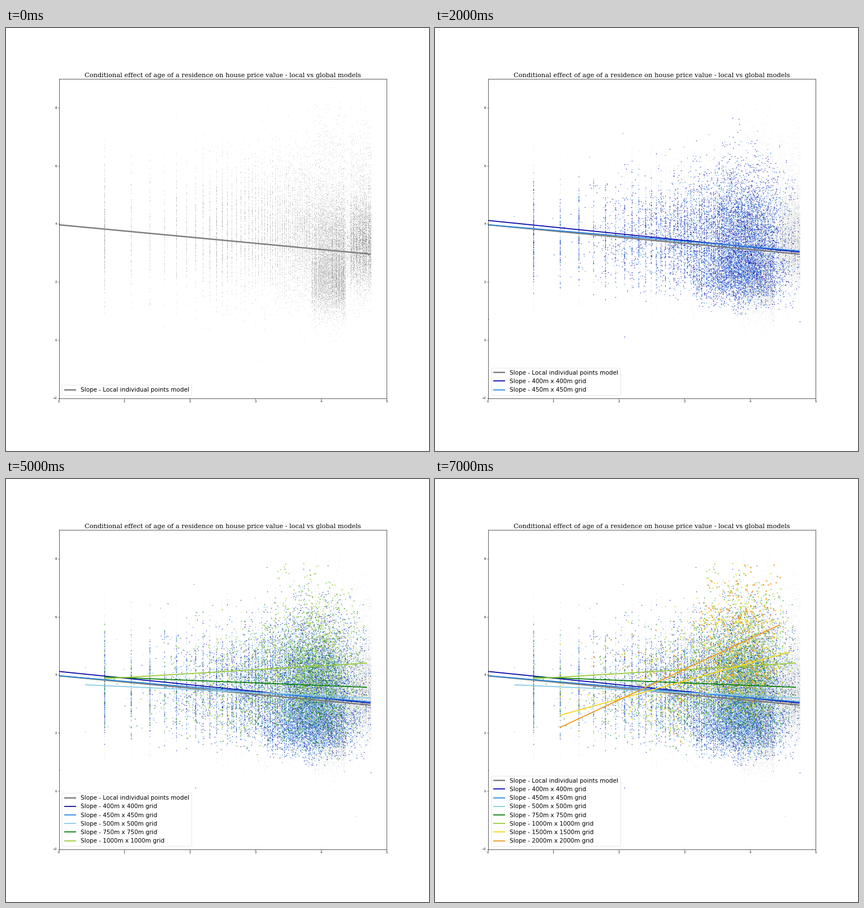
A matplotlib script that plays this animation: 748x748 px, repeating every 8000 ms.

```python
import numpy as np
import matplotlib.pyplot as plt
from matplotlib.animation import FuncAnimation

DPI = 37.4
PT = 72 / DPI  # points per pixel
rng = np.random.default_rng(11)


def pick(n, parts):
    """Draw n values from a mix of normals given as (weight, mean, sd)."""
    weight, mean, sd = np.array(parts).T
    k = rng.choice(len(parts), n, p=weight / weight.sum())
    return rng.normal(mean[k], sd[k])


def houses():
    """Single houses: ages are whole years, shown on a log scale."""
    years = np.arange(2, 117)
    weight = np.interp(years,
                       [2, 3, 5, 6, 8, 11, 12, 14, 30, 47, 49, 66, 78],
                       [360, 130, 85, 130, 150, 240, 240, 150, 150, 160, 320, 330, 300])
    weight[(years > 78) & (years < 85)] = 45
    weight[years >= 85] = 165
    n = 21000
    x = np.log(rng.choice(years, n, p=weight / weight.sum()))
    young = pick(n, [(.8, 3.5, 1.0), (.2, 4.8, 1.0)])
    mid = pick(n, [(.52, 2.1, .6), (.38, 3.5, .8), (.1, 4.8, 1.4)])
    old = pick(n, [(.8, 3.3, .75), (.2, 4.6, 1.3)])
    y = np.where(x < 3.85, young, np.where(x < 4.38, mid, old))
    y[x < 1.5] = np.clip(y[x < 1.5], .6, 6.9)
    return x, y


def cells(n, lo, hi, snap, parts, extra=()):
    """Grid cells: some keep a whole-year age, the rest are averages."""
    x = pick(n, [(.62, 3.92, .33), (.3, 3.25, .5), (.08, 2.2, .65)])
    whole = (rng.random(n) < snap) | (x < 1.6) & (rng.random(n) < .6)
    x[whole] = np.log(np.maximum(np.round(np.exp(x[whole])), 2))
    column = rng.random(n) < .035 * snap / .4
    x[column] = np.log(rng.choice([2, 2, 2, 3, 4, 6, 8, 9, 10], column.sum()))
    y = pick(n, parts)
    flat = x < 3.1
    y[flat] = pick(flat.sum(), [(.7, 3.3, .85), (.3, 4.1, .9)])
    ok = (x >= lo) & (x <= hi) & (y > .2) & (y < 7.85)
    ok &= y > 2.3 - .33 * x + rng.normal(0, .3, n)
    x, y = x[ok], y[ok]
    if extra:
        ex, ey = np.transpose(extra)
        x, y = np.append(x, ex), np.append(y, ey)
    return x, y


def grid_name(size):
    return f"Slope - {size}m x {size}m grid"


LOW = [(.5, 2.4, .62), (.4, 3.9, .72), (.1, 5.1, .85)]
MID = [(.45, 2.9, .7), (.4, 4.3, .7), (.15, 5.5, .9)]
HIGH = [(.3, 3.3, .5), (.48, 4.5, .7), (.22, 6.0, .85)]
TOP = [(.5, 3.9, .6), (.28, 4.9, .5), (.1, 5.85, .06), (.12, 6.2, .7)]
PEAK = [(.45, 4.1, .5), (.25, 5.3, .5), (.2, 6.1, .25), (.2, 7.1, .5)]

# label, colour, dot width in px, alpha, line ends, points
layers = [
    ("Slope - Local individual points model", "#7c7c7c", .6, .4,
     (0, 3.97, 4.754, 2.96), houses()),
    (grid_name(400), "#0606ae", 1.5, .8, (0, 4.12, 4.754, 3.03),
     cells(5600, .69, 4.754, .4, LOW, [(0, .72), (2.08, .11), (4.754, .63)])),
    (grid_name(450), "#2b87e0", 1.5, .8, (0, 3.97, 4.754, 3.07),
     cells(4600, .69, 4.754, .35, LOW, [(.405, 4.27)])),
    (grid_name(500), "#87cbe6", 1.6, .75, (.405, 3.66, 4.754, 3.21),
     cells(3600, .69, 4.754, .3, LOW, [(.405, 2.05), (4.53, -.86)])),
    (grid_name(750), "#0a800a", 1.8, .75, (.693, 3.93, 4.70, 3.575),
     cells(2000, .69, 4.70, .2, MID)),
    (grid_name(1000), "#9acb38", 2.4, .7, (.693, 3.87, 4.70, 4.41),
     cells(1150, .69, 4.70, .1, HIGH)),
    (grid_name(1500), "#f6d51c", 2.6, .75, (1.1, 2.61, 4.61, 4.79),
     cells(600, 1.09, 4.61, .08, TOP)),
    (grid_name(2000), "#ef951a", 2.8, .75, (1.1, 2.19, 4.455, 5.73),
     cells(330, 1.09, 4.455, .06, PEAK)),
]

fig, ax = plt.subplots(figsize=(20, 20), dpi=DPI)
fig.subplots_adjust(left=.125, right=.9, bottom=.125, top=.88)
ax.set(xlim=(0, 5), ylim=(-2, 9))
ax.set_xticks(range(6))
ax.set_yticks(range(-2, 9, 2))
ax.tick_params(labelsize=10, width=1.1)
for spine in ax.spines.values():
    spine.set_linewidth(1.2)
ax.set_title("Conditional effect of age of a residence on house price value"
             " - local vs global models", family="DejaVu Serif", size=22)

dots, lines = [], []
for i, (label, color, size, alpha, (x0, y0, x1, y1), (x, y)) in enumerate(layers):
    dots.append(ax.scatter(x, y, s=(size * PT) ** 2, color=color, alpha=alpha,
                           linewidths=0, zorder=1))
    lines += ax.plot([x0, x1], [y0, y1], color=color, lw=3.4 if i else 4.6,
                     label=label, zorder=2, solid_capstyle="butt")


def draw(step):
    mono = step == 1  # this step is shown in greys
    paper = "#fafafa" if mono else "white"
    fig.set_facecolor(paper)
    ax.set_facecolor(paper)
    for i, (dot, line) in enumerate(zip(dots, lines)):
        color = ("#5e5e5e", "#202020")[i] if mono and i < 2 else layers[i][1]
        dot.set_color(color)
        line.set_color(color)
        dot.set_visible(i <= step)
        line.set_visible(i <= step)
    dots[0].set_alpha((.75, .4)[step] if step < 2 else .33)
    legend = ax.legend(handles=lines[:step + 1], loc="lower left", fontsize=20,
                       facecolor=paper)
    legend.set_zorder(5)
    return dots + lines


anim = FuncAnimation(fig, draw, frames=len(layers), interval=1000,
                     repeat=True, repeat_delay=0, blit=False)
plt.show()
```
